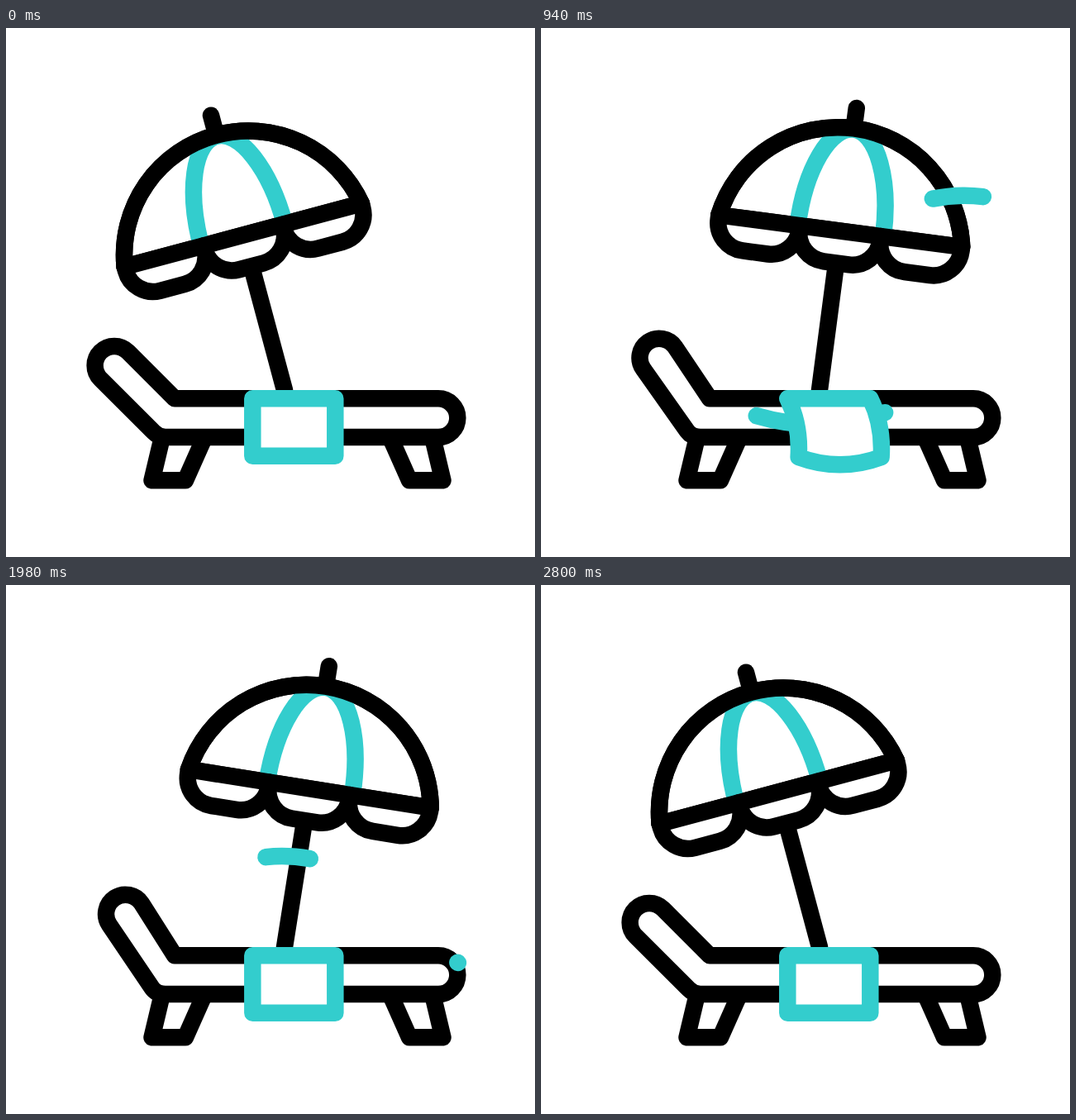
Write an HTML page that moves like this. It is 640x640 px and loops after 3.02 s.

```html
<!DOCTYPE html>
<html lang="en">
<head>
<meta charset="utf-8">
<title>Beach lounger in the wind</title>
<style>
  html, body { margin: 0; width: 100%; height: 100%; overflow: hidden; background: #fff; }
  svg { display: block; width: 100%; height: 100%; }
  path { fill: none; stroke: #000; stroke-width: 20.5; stroke-linecap: round; stroke-linejoin: round; }
  .teal { stroke: #33cdcd; }
  .solid { fill: #fff; }
</style>
</head>
<body>
<svg viewBox="0 0 640 640">
  <g id="umbrella">
    <path d="M0 0V-152M0 -344V-318"/>
    <path class="solid" stroke="none" d="M-148.2 -194A150.3 150.3 0 0 1 148.2 -194Z"/>
    <path class="teal" stroke-linecap="butt" d="M-52.2 -194A52.2 124 0 0 1 52.2 -194"/>
    <path id="scallops" class="solid"/>
    <path d="M-148.2 -194A150.3 150.3 0 0 1 148.2 -194Z"/>
  </g>
  <path d="M188 499L176.5 547.3H217L238.5 499M517 499L528.5 547.3H488L466.5 499"/>
  <path id="lounger" class="solid"/>
  <g id="wind">
    <path class="teal" pathLength="1" d="M288 217C325 238 372 250 437 217C462 208 510 194 562 210"/>
    <path class="teal" pathLength="1" d="M222 454C270 478 345 492 414 466C445 454 500 440 547 457"/>
    <path class="teal" pathLength="1" d="M64 335C110 352 175 374 225 357S310 316 386 335"/>
  </g>
  <path id="towel" class="teal solid"/>
</svg>
<script>
const LOOP = 3020;
const $ = id => document.getElementById(id);
const clamp = x => Math.min(1, Math.max(0, x));
const smooth = x => x * x * (3 - 2 * x);
const easeOut = x => 1 - (1 - clamp(x)) ** 3;
const mix = (a, b, k) => a + (b - a) * k;

// [time, value] keys
const swayKeys = [[200, 0], [788, 1], [1150, 0.835], [1500, 1], [2000, 1], [2800, 0]];
const backKeys = [[200, 0], [788, 1], [1150, 0.715], [1500, 1], [2000, 1], [2800, 0]];
const towelKeys = [[200, 0], [700, 1.04], [1150, 0.92], [1500, 1], [2000, 0]];

// Each gust's tail follows its head along the same path
const gustStarts = [272, 615, 1215];
const GUST_SPAN = 1240, TAIL_DELAY = 272;

function track(keys, t) {
  let value = keys[0][1];
  for (let i = 1; i < keys.length; i++) {
    const [t0, v0] = keys[i - 1], [t1, v1] = keys[i];
    if (t >= t0) value = mix(v0, v1, smooth(clamp((t - t0) / (t1 - t0))));
  }
  return value;
}

function drawLounger(k) {
  const turn = 11.5 * k * Math.PI / 180, angle = Math.PI / 4 + turn;
  const c = Math.cos(turn), s = Math.sin(turn), r = 23.4;
  const x = 188.4 - 57.4 * c + 61.7 * s, y = 470 - 57.4 * s - 61.7 * c;
  const nx = r * Math.sin(angle), ny = -r * Math.cos(angle);
  const lowX = x - nx, lowY = y - ny, cornerX = 185 - 3.3 * k;
  const d = 9 / Math.hypot(cornerX - lowX, 495 - lowY);
  $('lounger').setAttribute('d',
    `M204 448.3H523A23.35 23.35 0 0 1 523 495H193` +
    `Q${cornerX} 495 ${mix(cornerX, lowX, d)} ${mix(495, lowY, d)}` +
    `L${lowX} ${lowY}A${r} ${r} 0 0 1 ${x + nx} ${y + ny}Z`);
}

function drawTowel(k) {
  const shift = 13.7 * k, bulge = 16.2 * k, bottom = 517.7 + 1.4 * k;
  const left = 298.3, right = 398.3;
  $('towel').setAttribute('d',
    `M${left} 448.3H${right}Q${right + bulge} 480 ${right + shift} ${bottom}` +
    `Q${348.3 + shift} ${bottom + 19 * k} ${left + shift} ${bottom}` +
    `Q${left + bulge} 480 ${left} 448.3Z`);
}

function drawGust(path, age) {
  const head = easeOut(age / GUST_SPAN);
  const tail = easeOut((age - TAIL_DELAY) / GUST_SPAN);
  path.style.display = age > 0 && age < TAIL_DELAY + GUST_SPAN ? '' : 'none';
  path.style.strokeDasharray = `${Math.max(0.001, head - tail)} 3`;
  path.style.strokeDashoffset = -Math.min(tail, 0.998);
}

function draw(t) {
  $('umbrella').setAttribute('transform', `translate(337 438) rotate(${-15 + 24 * track(swayKeys, t)})`);
  drawLounger(track(backKeys, t));
  drawTowel(track(towelKeys, t));
  gustStarts.forEach((start, i) => drawGust($('wind').children[i], t - start));
}

$('scallops').setAttribute('d', 'M-148.2 -194' +
  'v5a34 34 0 0 0 34 34h30.8a34 34 0 0 0 34 -34v-5'.repeat(3));

const begin = performance.now();
function tick() {
  draw((performance.now() - begin) % LOOP);
  requestAnimationFrame(tick);
}
tick();
</script>
</body>
</html>
```
